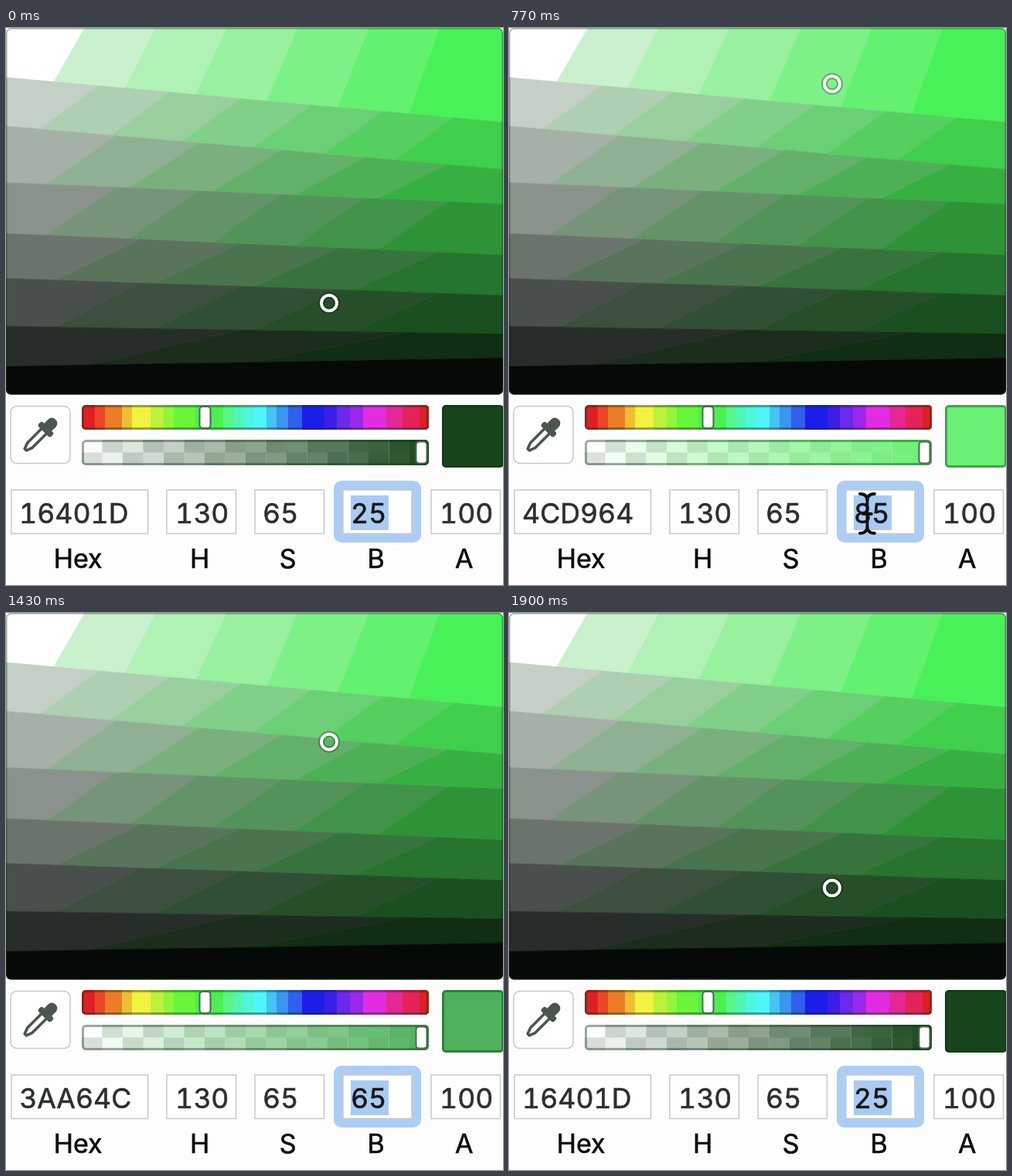
These frames come from a looping animation (643x721 px, 2 s). An HTML page:

```html
<!DOCTYPE html>
<html lang="en">
<head>
<meta charset="utf-8">
<title>Colour picker</title>
<style>
  html, body { margin: 0; height: 100%; overflow: hidden; background: #fcfdfc; }
  svg { display: block; width: 100vw; height: 100vh; }
  text { font-family: Inter, "Open Sans", sans-serif; stroke-width: .6; }
  .value { font-size: 35.7px; fill: #2b302d; stroke: #2b302d; font-variant-numeric: tabular-nums; }
  .label { font-size: 34px; fill: #0c0e0d; stroke: #0c0e0d; text-anchor: middle; }
  .active { fill: #141816; stroke: #141816; }
  .box { fill: #fff; stroke: #c6cac7; stroke-width: 1.5; }
  .edge { fill: none; stroke: #0a300f; stroke-opacity: .4; stroke-width: 3; }
  .handle { fill: #fff; stroke: #4c664f; stroke-width: 2; }
</style>
</head>
<body>
<svg viewBox="0 0 643 721" preserveAspectRatio="none">
  <defs>
    <clipPath id="panelClip"><rect width="643" height="474.5" rx="6"/></clipPath>
    <clipPath id="hueClip"><rect x="98" y="488" width="449" height="32" rx="5"/></clipPath>
    <clipPath id="alphaClip"><rect x="98" y="533" width="449" height="33" rx="5"/></clipPath>
  </defs>

  <g id="field" clip-path="url(#panelClip)"></g>
  <rect x=".75" y=".75" width="641.5" height="473" rx="6" class="edge" style="stroke-width:1.5"/>
  <g id="ring" fill="none">
    <circle r="10" stroke="#000" stroke-opacity=".28" stroke-width="8"/>
    <circle r="10" stroke="#fbfdfb" stroke-width="4"/>
  </g>

  <rect x="6" y="489.5" width="77" height="74" rx="8" class="box"/>
  <g transform="translate(50 521) rotate(45)" fill="#4a564e">
    <path d="M-4.500 0V27L-1.500 35H1.500L4.500 27V0" fill="#fff" stroke="#4a564e" stroke-width="3.6" stroke-linejoin="round"/>
    <rect x="-7" y="-20" width="14" height="20" rx="6.5"/>
    <rect x="-11.5" y="-6" width="23" height="8" rx="3"/>
  </g>

  <g id="hue" clip-path="url(#hueClip)"></g>
  <rect x="99.5" y="489.5" width="446" height="29" rx="4" class="edge"/>
  <rect x="250.5" y="490" width="14" height="28" rx="4" class="handle"/>

  <g clip-path="url(#alphaClip)">
    <g id="checker"></g>
    <g id="alpha"></g>
  </g>
  <rect x="99.5" y="534.5" width="446" height="30" rx="4" class="edge"/>
  <rect x="530.5" y="535.5" width="14" height="28" rx="4" class="handle"/>

  <rect id="swatch" x="564" y="488" width="80" height="81" rx="5"/>
  <rect x="565.5" y="489.5" width="77" height="78" rx="4" class="edge"/>

  <rect x="424" y="586" width="113" height="80" rx="10" fill="#adcdf4"/>
  <g id="inputs"></g>

  <path id="cursor" fill="none" stroke="#111" stroke-width="3.8" stroke-linecap="round"
    d="M454 603Q463.500 603 463.500 612V645Q463.500 654 454 654M473 603Q463.500 603 463.500 612M463.500 645Q463.500 654 473 654M458 629H469"/>
</svg>

<script>
const LOOP = 2000;
const steps = [
  { at: 0, b: 25, hex: '16401D', shown: '#18461c' },
  { at: 770, b: 85, hex: '4CD964', shown: '#6af074' },
  { at: 1310, b: 75, hex: '43BF58', shown: '#50cd5b' },
  { at: 1430, b: 65, hex: '3AA64C', shown: '#4fb15b' },
  { at: 1550, b: 55, hex: '318C40', shown: '#4b9152' },
  { at: 1670, b: 45, hex: '287335', shown: '#2d7035' },
  { at: 1790, b: 35, hex: '1F5929', shown: '#225c2a' },
  { at: 1900, b: 25, hex: '16401D', shown: '#18461c' }
];

const $ = id => document.getElementById(id);

function add(parent, tag, attrs, content = '') {
  const node = document.createElementNS('http://www.w3.org/2000/svg', tag);
  for (const name in attrs) node.setAttribute(name, attrs[name]);
  node.textContent = content;
  parent.append(node);
  return node;
}

// Brightness bands: lower edge at the left and right side, green level,
// number of saturation cells, sideways lean of the cell borders.
const bands = [
  [64, 122, 241, 7, 20],
  [127, 183, 207, 7, 38],
  [200, 228, 176, 6, 45],
  [266, 294, 147, 6, 45],
  [324, 346, 116, 5, 55],
  [386, 396, 79, 5, 55],
  [438, 427, 45, 3, 100],
  [475, 475, 10, 1, 0]
];

function drawField() {
  let top = [0, 0];
  const edgeY = ([left, right], x) => left + (right - left) * x / 643;
  bands.forEach(([left, right, green, count, lean], row) => {
    const bottom = [left, right];
    const border = i => i === 0 ? -300 : i === count ? 950 : 643 * i / count - 10;
    for (let i = 0; i < count; i++) {
      const corner = (edge, k, shift) => {
        const x = border(k) + shift;
        return x + ',' + edgeY(edge, x);
      };
      const s = (i + .5) / count;
      const fill = row + i === 0 ? '#fefffe'
        : `rgb(${green * (1 - .75 * s)},${green},${green * (1 - .68 * s)})`;
      add($('field'), 'polygon', {
        points: [corner(top, i, lean), corner(top, i + 1, lean),
                 corner(bottom, i + 1, -lean), corner(bottom, i, -lean)].join(' '),
        fill, stroke: fill, 'stroke-width': .6
      });
    }
    top = bottom;
  });
}

function drawHue() {
  const stops = '98 #de2024,115 #eb4628,128 #eb7d28,150 #f0be32,163 #f2f240,187 #bef03c,' +
    '204 #91f53c,217 #69f53c,245 #4bf050,281 #58f58c,294 #50f5b8,307 #50f5de,320 #50f5fa,' +
    '337 #46c3f5,350 #3c96f0,365 #325feb,383 #1e1eeb,412 #3c1ee6,428 #6e28eb,445 #9b28eb,' +
    '462 #e12de1,492 #e42896,513 #e4235a,535 #de2024';
  for (const stop of stops.split(',')) {
    const [x, fill] = stop.split(' ');
    add($('hue'), 'rect', { x, y: 488, width: 547 - x, height: 32, fill });
  }
}

function drawAlpha() {
  const columns = 17, width = 26.5;
  for (let i = 0; i < columns; i++) {
    const x = 98 + i * width;
    for (let row = 0; row < 2; row++) {
      add($('checker'), 'rect', {
        x, y: 533 + row * 16.5, width: width + .5, height: 17,
        fill: (i + row) % 2 ? '#dbe0dc' : '#fff'
      });
    }
    add($('alpha'), 'rect', { x, y: 533, width, height: 33, 'fill-opacity': (i + .3) / columns });
  }
}

function addInput(label, x, width, textX, value) {
  const inputs = $('inputs'), active = label === 'B';
  add(inputs, 'rect', { x, y: 598, width, height: 56.5, class: 'box' });
  if (active) add(inputs, 'rect', { x: 446, y: 605, width: 49, height: 45, fill: '#a9caf2' });
  add(inputs, 'text', { x: x + width / 2 - 2, y: 699, class: 'label' }, label);
  return add(inputs, 'text', { x: textX, y: 641, class: active ? 'value active' : 'value' }, value);
}

drawField();
drawHue();
drawAlpha();
const hexText = addInput('Hex', 7, 176.5, 17, '');
addInput('H', 208, 89.5, 219, '130');
addInput('S', 322, 89.5, 332, '65');
const brightText = addInput('B', 436, 89, 446, '');
addInput('A', 550, 89.5, 561, '100');

let current;
function frame() {
  const time = performance.now() % LOOP;
  const step = steps.findLast(s => s.at <= time);
  if (step !== current) {
    current = step;
    hexText.textContent = step.hex;
    brightText.textContent = step.b;
    $('ring').setAttribute('transform', `translate(418 ${1.3 + 473 * (1 - step.b / 100)})`);
    $('swatch').setAttribute('fill', step.shown);
    $('alpha').setAttribute('fill', step.shown);
    $('cursor').setAttribute('visibility', step.b === 85 ? 'visible' : 'hidden');
  }
  requestAnimationFrame(frame);
}
frame();
</script>
</body>
</html>
```
